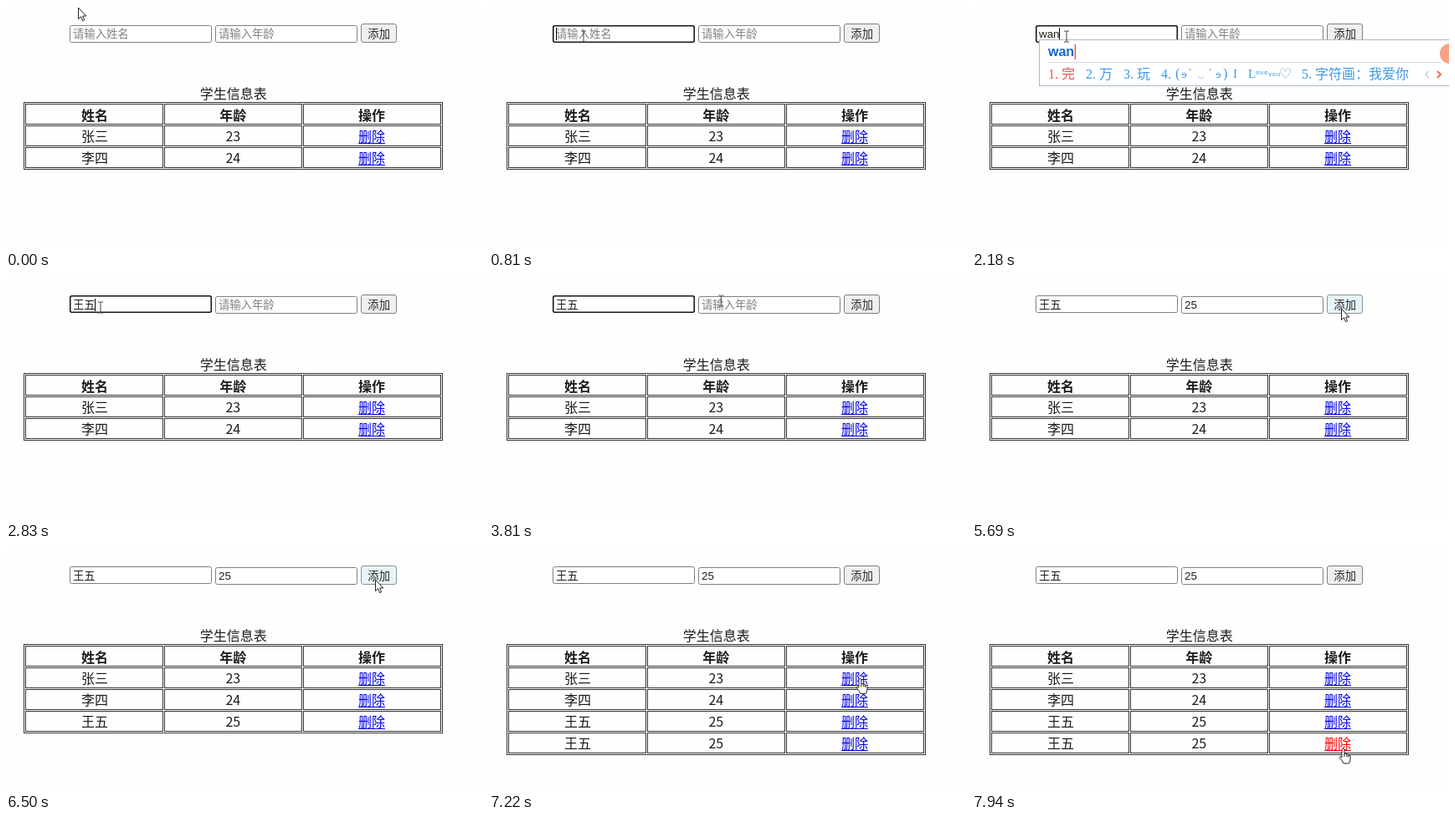
An HTML page for the animation above (8000 ms loop, 570x291 px).

```html
<!DOCTYPE html>
<html lang="zh-CN">
<head>
<meta charset="utf-8">
<title>学生信息表</title>
<style>
  html, body { margin: 0; width: 100%; height: 100%; overflow: hidden; background: #fefefe; }
  svg { display: block; width: 570px; height: 291px; }
  text { font: 16px "Noto Sans CJK SC", "Noto Sans CJK", "Noto Sans CJK JP", sans-serif; white-space: pre; }
  .field { font: 13.333px "Liberation Sans", "Noto Sans CJK SC", "Noto Sans CJK", "Noto Sans CJK JP", sans-serif; }
  .mid { text-anchor: middle; }
  .head { font-weight: bold; }
  .pinyin { font: bold 16px "Liberation Sans", sans-serif; }
  .num { font: 16px "Liberation Serif", serif; }
  .cand { font-weight: 300; }
  .sym { font-family: "DejaVu Sans", sans-serif; }
  .line { fill: none; stroke: #333; }
</style>
</head>
<body>
<svg id="stage" viewBox="0 0 570 291"></svg>
<script>
const LOOP = 8000, STEP = 90;
const INK = '#1c1c1c', BLUE = '#3c98e6', RED = '#f4504a';
const stage = document.getElementById('stage');

function add(parent, tag, attrs = {}, content) {
  const el = document.createElementNS('http://www.w3.org/2000/svg', tag);
  set(el, attrs);
  if (content !== undefined) el.textContent = content;
  parent.append(el);
  return el;
}
function set(el, attrs) {
  for (const k in attrs) el.setAttribute(k, attrs[k]);
}
const show = (el, on) => set(el, { visibility: on ? 'visible' : 'hidden' });
const group = parent => add(parent, 'g');
const text = (parent, x, y, str, cls = '', fill = INK) =>
  add(parent, 'text', { x, y, class: cls, fill }, str);
const latest = (table, t) => table.reduce((hit, row) => row[0] <= t ? row : hit);

// Form
function makeInput(x, hint) {
  const box = add(stage, 'rect', { x: x + .5, width: 169, height: 20, rx: 2, fill: '#fff', stroke: '#808080' });
  const ring = add(stage, 'rect', { x: x + .75, width: 168.5, height: 19.5, rx: 2, fill: 'none', stroke: '#181818', 'stroke-width': 1.6 });
  const label = text(stage, x + 4, 38, '', 'field');
  const caret = add(stage, 'rect', { y: 26, width: 1, height: 15, fill: '#000' });
  return (value, focus, blink) => {
    const top = /[\u4e00-\u9fff]/.test(value) ? 22 : 23;
    set(box, { y: top + .5 });
    set(ring, { y: top + .75 });
    show(ring, focus);
    if (label.textContent !== (value || hint)) label.textContent = value || hint;
    set(label, { fill: value ? INK : '#808080' });
    set(caret, { x: Math.round(x + 3.5 + (value ? label.getComputedTextLength() : 0)) });
    show(caret, focus && blink);
  };
}
const nameInput = makeInput(76, '请输入姓名');
const ageInput = makeInput(250, '请输入年龄');
const button = add(stage, 'rect', { x: 424.5, y: 21.5, width: 42, height: 22, rx: 2.5 });
text(stage, 445.7, 38, '添加', 'field mid', '#2a2a2a');

// Table
const COLS = [[23, 106], [189, 271.3], [355, 437]];
text(stage, 271.7, 111.3, '学生信息表', 'mid');
const frame = add(stage, 'rect', { x: 21.5, y: 115.5, width: 500, class: 'line' });
const rows = [['姓名', '年龄', '操作'], ['张三', '23'], ['李四', '24'], ['王五', '25'], ['王五', '25']]
  .map((cells, i) => {
    const g = group(stage), y = 117 + 26 * i, base = i ? 136 + 26 * i : 136.5;
    COLS.forEach(([x, mid], c) => {
      add(g, 'rect', { x: x + .5, y: y + .5, width: 164, height: 24, class: 'line' });
      if (cells[c]) text(g, mid, base, cells[c], i ? 'mid' : 'mid head');
    });
    if (i) {
      g.link = group(g);
      text(g.link, 437, base, '删除', 'mid', 'inherit').removeAttribute('fill');
      add(g.link, 'rect', { x: 421, y: base + 2, width: 32, height: 1 });
    }
    return g;
  });

// Input method panel
const WORDS = {
  w: ['我', '为', '无', '万', '问'],
  wa: ['哇', '挖', '娃', '瓦', '袜'],
  wan: ['完', '万', '玩', null, '字符画：我爱你'],
  wang: ['王', '网', '往', '望', '忘'],
  wangwu: ['王五', '王武', '王', '网', '往']
};
const panel = group(stage);
add(panel, 'rect', { x: 80.5, y: 40.5, width: 500, height: 55, fill: '#fff', stroke: '#a9b9c9' });
add(panel, 'path', { d: 'M90 67.5H560', stroke: '#d5dbe1' });
add(panel, 'circle', { cx: 571, cy: 57, r: 12, fill: '#f7a283' });
add(panel, 'path', { d: 'M546 78l-4 4 4 4', fill: 'none', stroke: '#c8ccd0', 'stroke-width': 1.5 });
add(panel, 'path', { d: 'M556 78l4 4-4 4', fill: 'none', stroke: '#f26a45', 'stroke-width': 2 });
const pages = Object.entries(WORDS).map(([key, words]) => {
  const g = group(panel);
  const typed = text(g, 91, 60, key, 'pinyin', '#1467c8');
  const mark = add(g, 'rect', { y: 46, width: 1.3, height: 18, fill: '#f04030' });
  let x = 91;
  words.forEach((word, i) => {
    const fill = i ? BLUE : RED;
    text(g, x, 87, i + 1 + '.', 'num', fill);
    if (word) text(g, x + 16, 87, word, 'cand', fill);
    else drawFace(g, x + 16, fill);
    x += word ? 29 + 16 * word.length : 168;
  });
  return { key, g, typed, mark };
});
function drawFace(g, x, fill) {
  [[1, 86, '(', 16], [8, 86, 'ɘ', 11], [17, 85, '′', 14], [28, 86, '◡', 8], [41, 85, '‵', 14],
   [49, 86, 'ɘ', 11], [58, 86, ')', 16], [70, 86, 'I', 15], [88, 86, 'L', 15],
   [97, 86, 'ᵒᵛᵉ', 12], [112, 84, 'ᵧₒᵤ', 12], [125, 87, '♡', 17]]
    .forEach(([dx, y, str, size]) => {
      const cls = /[(I)L]/.test(str) ? 'num' : 'sym';
      text(g, x + dx, y, str, cls, fill).style.fontSize = size + 'px';
    });
}

// Pointers, drawn around their hot spot
const pen = { fill: '#fff', stroke: '#222', 'stroke-width': 1, 'stroke-linejoin': 'round' };
const pointers = {
  arrow: add(stage, 'path', { ...pen, d: 'M.5 0V13.5L3.5 10.8 5.6 15.6 7.7 14.7 5.6 10H9.8Z' }),
  beam: add(stage, 'path', { d: 'M-3-6.5H-1L0-6 1-6.5H3M0-6V6M-3 6.5H-1L0 6 1 6.5H3', fill: 'none', stroke: '#444' }),
  hand: add(stage, 'path', { ...pen, d: 'M-2 1q1.5-2 3 0v6l1-.8q1.5-.3 1.8.8 1.6-.6 2 .8 1.8-.4 2.2 1.2v4.5q-.4 2.8-1.5 4.5h-6.5q-1-2.8-4.3-6.3-.6-2.2 1-2l1.3 1.3ZM1 7v3M3.8 7v3M5.8 8v2.5' })
};

// Start, number of steps, end point
const MOVES = [
  [-STEP, 1, 86, 2], [90, 1, 84, 16], [350, 2, 87, 33], [640, 1, 113, 36.5],
  [3360, 7, 287, 28], [5060, 4, 441, 38], [6860, 9, 446, 241], [7670, 1, 444, 240]
];
const NAME = [[0, ''], [1910, 'w'], [2000, 'wa'], [2180, 'wan'], [2270, 'wang'], [2360, 'wangwu'], [2830, '王五']];
const AGE = [[0, ''], [4790, '2'], [5060, '25']];
const FOCUS = [[0, ''], [810, 'name'], [4080, 'age'], [5690, '']];
const BLINK = [[0, true], [1350, false], [1910, true], [3360, false], [3900, true], [4610, false], [4790, true]];
const PRESS = [[0, false], [5690, true], [5780, false], [6500, true], [6590, false]];
const COUNT = [[0, 3], [5780, 4], [6590, 5]];

const ease = p => p * p * (3 - 2 * p);
function pointerAt(t) {
  const i = MOVES.indexOf(latest(MOVES, t));
  const [start, n, x, y] = MOVES[i], from = MOVES[Math.max(0, i - 1)];
  const p = ease(Math.min(n, Math.floor((t - start) / STEP) + 1) / n);
  return [from[2] + (x - from[2]) * p, from[3] + (y - from[3]) * p];
}
const within = (x, y, l, t, r, b) => x >= l && x < r && y >= t && y < b;

function draw(t) {
  const name = latest(NAME, t)[1], focus = latest(FOCUS, t)[1], blink = latest(BLINK, t)[1];
  const count = latest(COUNT, t)[1], pressed = latest(PRESS, t)[1];
  const [x, y] = pointerAt(t);

  nameInput(name, focus === 'name', blink);
  ageInput(latest(AGE, t)[1], focus === 'age', blink);

  const hover = within(x, y, 424, 21, 467, 44);
  set(button, {
    fill: pressed ? '#e6f4fa' : hover ? '#e5e5e5' : '#efefef',
    stroke: pressed ? '#8d9498' : '#808080'
  });

  set(frame, { height: 26 * count + 2 });
  rows.forEach((row, i) => {
    row.style.display = i < count ? '' : 'none';
    if (row.link) set(row.link, { fill: i === 4 && t >= 7940 ? '#f00' : '#00e' });
  });

  panel.style.display = name in WORDS ? '' : 'none';
  for (const { key, g, typed, mark } of pages) {
    g.style.display = key === name ? '' : 'none';
    if (key === name) set(mark, { x: 91.5 + typed.getComputedTextLength() });
  }

  const onInput = within(x, y, 76, 23, 246, 44) || within(x, y, 250, 23, 420, 44);
  const onLink = rows.some((_, i) => i && i < count && within(x, y, 421, 122 + 26 * i, 453, 140 + 26 * i));
  const kind = onInput ? 'beam' : onLink ? 'hand' : 'arrow';
  for (const k in pointers) {
    show(pointers[k], k === kind);
    set(pointers[k], { transform: `translate(${x} ${y})` });
  }
}

const begin = performance.now();
function tick() {
  draw((performance.now() - begin) % LOOP);
  requestAnimationFrame(tick);
}
tick();
</script>
</body>
</html>
```
